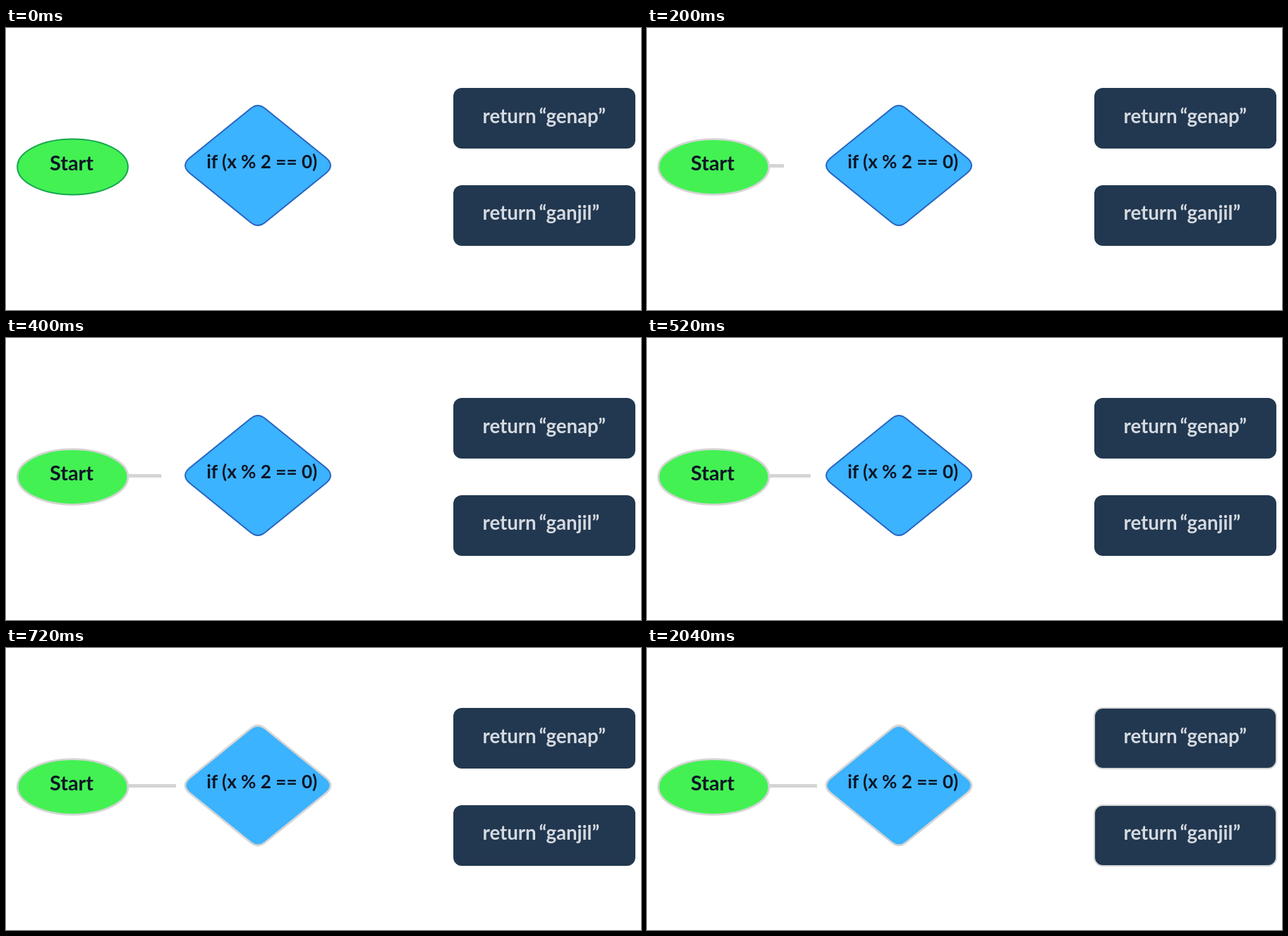
An HTML page that plays this animation: 900x400 px, repeating every 2520 ms.

```html
<!DOCTYPE html>
<html lang="id">
<head>
<meta charset="utf-8">
<style>
  html, body { margin: 0; width: 100%; height: 100%; overflow: hidden; background: #fff; }
  svg { display: block; width: 900px; height: 400px; }
  text { font: 700 26.1px Lato, "Noto Sans", sans-serif; fill: #0d1526; }
  .centre { text-anchor: middle; }
  .title { font-size: 28.8px; }
  .result text { font-size: 27.6px; word-spacing: -3px; fill: #d5d9e0; }
  .start { fill: #43f153; stroke: #16a750; }
  .test { fill: #3bb3ff; stroke: #2764c0; }
  .result rect { fill: #223850; }
  .shape { stroke-width: 2; }
  .shape.lit { stroke: #d5d5d5; stroke-width: 2.8; }
  .result .lit { stroke-width: 2; }
  #link { stroke: #d5d5d5; stroke-width: 5; }
</style>
</head>
<body>
<svg viewBox="0 0 900 400">
  <line id="link" x1="172" y1="195.5" x2="172" y2="195.5"/>
  <ellipse class="shape start" data-at="40" cx="94.5" cy="197" rx="78.4" ry="39.4"/>
  <text class="centre title" x="93" y="201.5">Start</text>
  <path class="shape test" data-at="720" d="M347 114 Q357 106 367 114 L454 184.5 Q466 195 454 205.5 L367 276 Q357 284 347 276 L260 205.5 Q248 195 260 184.5 Z"/>
  <text class="centre" x="362.7" y="198.5">if (x % 2 == 0)</text>
  <g class="result">
    <rect class="shape" data-at="2040" x="634" y="85" width="258" height="86" rx="12"/>
    <text x="675.5" y="134.5">return “genap”</text>
    <rect class="shape" data-at="2040" x="634" y="223" width="258" height="86" rx="12"/>
    <text x="675.5" y="272">return “ganjil”</text>
  </g>
</svg>
<script>
  const LOOP = 2520, STEP = 40;
  const LINK_START = 172, LINK_END = 241, LINK_DONE = 720;
  const link = document.getElementById("link");
  const shapes = [...document.querySelectorAll(".shape")];
  const origin = performance.now();

  // The connector slows down as it nears the decision.
  function linkTip(t) {
    if (t < STEP) return LINK_START;
    const left = Math.max(0, LINK_DONE - t) / 520;
    return Math.max(LINK_START, LINK_END - 47 * left ** 1.7);
  }

  function draw(now) {
    const elapsed = Math.max(0, now - origin) % LOOP;
    const t = Math.floor(elapsed / STEP) * STEP;
    link.setAttribute("x2", linkTip(t));
    for (const shape of shapes) shape.classList.toggle("lit", t >= +shape.dataset.at);
    requestAnimationFrame(draw);
  }
  draw(origin);
</script>
</body>
</html>
```
